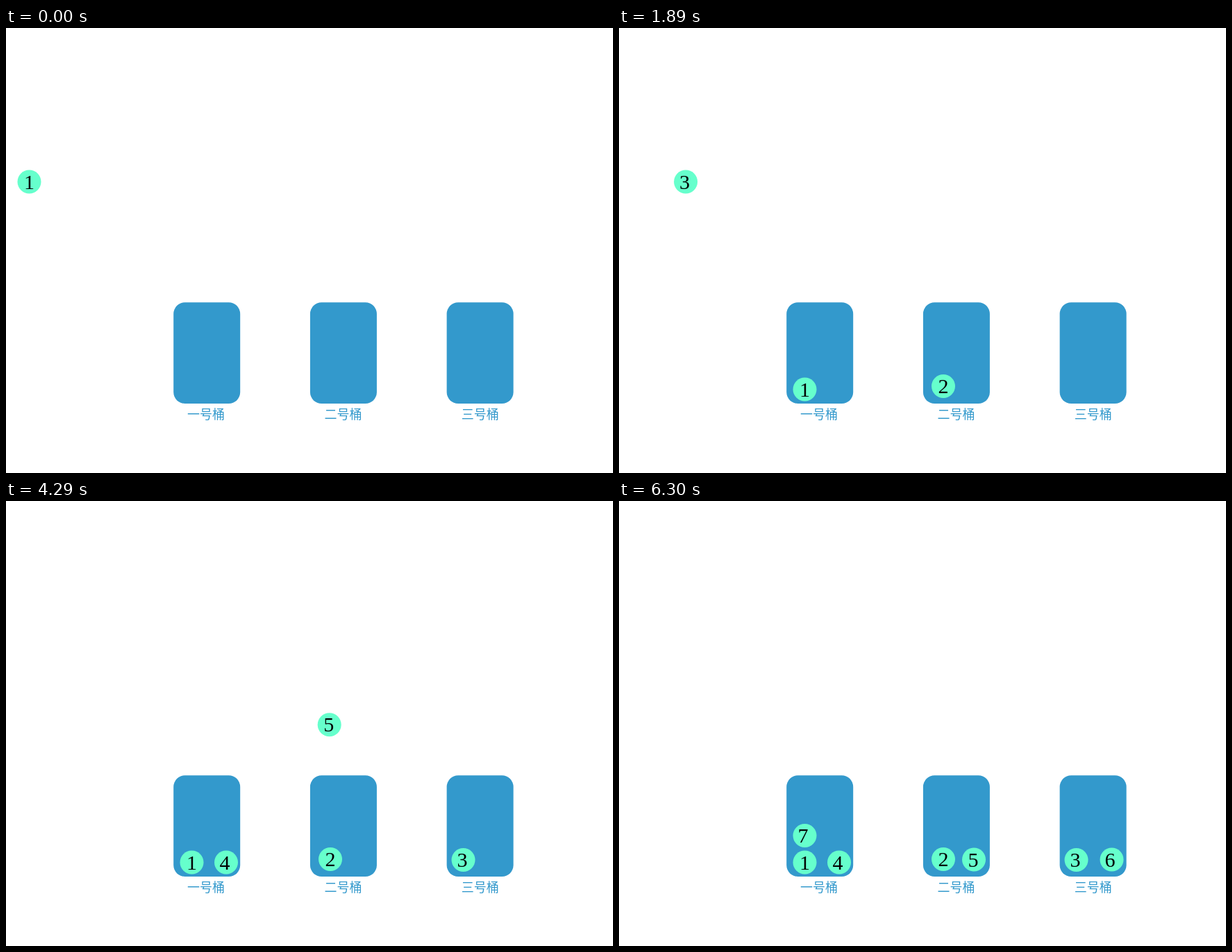
Recreate the animation shown at these times as an HTML page. Size 874 by 641 pixels, loop 6960 ms.

```html
<!DOCTYPE html>
<html lang="zh">
<head>
<meta charset="utf-8">
<title>轮流入桶</title>
<style>
  html, body { margin: 0; width: 100%; height: 100%; overflow: hidden; background: #fff; }
  svg { display: block; width: 874px; height: 641px; }
  .bucket { fill: #3399cc; }
  .bucket text { font: 18px "Noto Sans CJK SC", "Noto Sans CJK", sans-serif; }
  .ball circle { fill: #66ffcc; }
  .ball text { font: 30px "Liberation Serif", "Times New Roman", serif; }
  text { text-anchor: middle; }
</style>
</head>
<body>
<svg id="stage" viewBox="0 0 874 641"></svg>
<script>
const STEP = 30, LOOP = 6960, FLIGHT = 30;
const LANE = 221.5, BEND = 185;
const stage = document.getElementById('stage');

// from: where its balls enter; wait: steps before they do
const buckets = [
  { name: '一号桶', from: 33.5, wait: 0 },
  { name: '二号桶', from: 37, wait: 0 },
  { name: '三号桶', from: 38.5, wait: 1 }
];

// x, y: resting place; dx: digit offset; rush: share of the way made up at the end
const balls = [
  { x: 267.5, y: 520.5, dx: 0, rush: 0.12 },
  { x: 467, y: 516, dx: 0, rush: 0.12 },
  { x: 658.5, y: 517, dx: -1.5, rush: 0 },
  { x: 317, y: 520.5, dx: -2, rush: 0.12 },
  { x: 511, y: 516.5, dx: -1, rush: 0.12 },
  { x: 709.5, y: 516.5, dx: -2.5, rush: 0 },
  { x: 267.5, y: 482, dx: -2.5, rush: 0 }
];

function make(tag, attrs, text) {
  const el = document.createElementNS('http://www.w3.org/2000/svg', tag);
  for (const key in attrs) el.setAttribute(key, attrs[key]);
  if (text) el.textContent = text;
  return el;
}

function group(name, ...children) {
  const g = make('g', { class: name });
  g.append(...children);
  return stage.appendChild(g);
}

buckets.forEach((bucket, i) => {
  const x = 241.2 + i * 196.7;
  bucket.centre = x + 48;
  group('bucket',
    make('rect', { x, y: 395.2, width: 96, height: 145.8, rx: 16.5 }),
    make('text', { x: 288 + i * 197.4, y: 563 }, bucket.name));
});

balls.forEach((ball, i) => {
  const { centre, from, wait } = buckets[i % buckets.length];
  const low = LANE + BEND;
  ball.start = i * FLIGHT + wait;
  // Along the lane, round the bend into the bucket, then aside to its place
  ball.path = make('path', {
    d: `M${from} ${LANE} H${centre - BEND} A${BEND} ${BEND} 0 0 1 ${centre} ${low}
        Q${centre} ${(low + ball.y) / 2} ${ball.x} ${ball.y}`
  });
  ball.length = ball.path.getTotalLength();
  ball.el = group('ball',
    make('circle', { r: 17 }),
    make('text', { x: ball.dx, y: 10 }, i + 1));
});

function draw(time) {
  const now = Math.floor(time % LOOP / STEP);
  for (const { el, start, path, length, rush } of balls) {
    const u = Math.min((now - start) / FLIGHT, 1);
    el.setAttribute('visibility', u < 0 ? 'hidden' : 'visible');
    if (u < 0) continue;
    const way = (1 - rush) * u + rush * u ** 6;
    const { x, y } = path.getPointAtLength(way * length);
    el.setAttribute('transform', `translate(${x} ${y})`);
  }
}

const origin = performance.now();
function tick() {
  draw(performance.now() - origin);
  requestAnimationFrame(tick);
}
tick();
</script>
</body>
</html>
```
